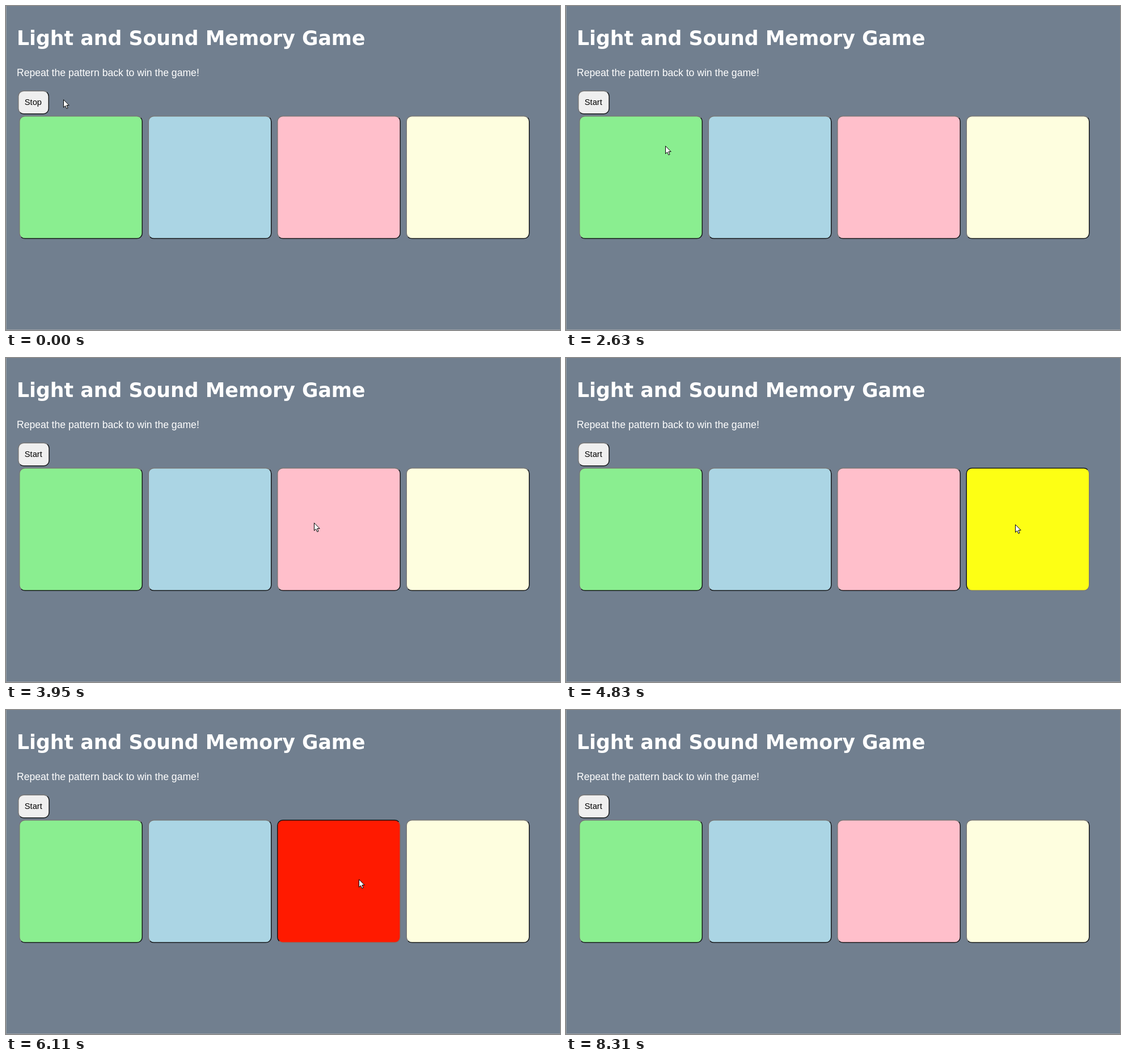
Write an HTML page that moves like this. It is 977 px wide and 573 px high and loops after 9.06 s.

```html
<!DOCTYPE html>
<html lang="en">
<head>
<meta charset="utf-8">
<title>Light and Sound Memory Game</title>
<style>
  html, body { margin: 0; width: 100%; height: 100%; overflow: hidden; background: #717f8f; }
  svg { display: block; width: 977px; height: 573px; }
  text { font-family: "Liberation Sans", Arial, sans-serif; fill: #fff; }
  .title { font: bold 34.75px "DejaVu Sans", Verdana, sans-serif; }
  .intro { font-size: 17.6px; }
  .label { font-size: 14.67px; fill: #000; }
</style>
</head>
<body>
<svg viewBox="0 0 977 573">
  <defs>
    <linearGradient id="raised" x2="1" y2="1">
      <stop offset=".5" stop-color="#767676"/><stop offset=".5" stop-color="#151719"/>
    </linearGradient>
    <linearGradient id="sunken" x2="1" y2="1">
      <stop offset=".5" stop-color="#151719"/><stop offset=".5" stop-color="#767676"/>
    </linearGradient>
  </defs>
  <rect width="977" height="573" fill="#717f8f"/>
  <path d="M.5 0V572.5H977" fill="none" stroke="#9a9fa5"/>
  <text class="title" x="18.9" y="69">Light and Sound Memory Game</text>
  <text class="intro" x="19" y="124">Repeat the pattern back to win the game!</text>
  <rect id="button" x="21.75" y="150.25" height="40.5" rx="9.5" fill="#efefef" stroke="url(#raised)" stroke-width="1.5"/>
  <text id="label" class="label" x="32.8" y="175"></text>
  <g id="tiles"></g>
  <path id="cursor" d="M.5 .7V14.3L3.6 11.4 5.8 16.4 8 15.5 5.9 10.6H10.2Z" fill="#fff" stroke="#000"/>
</svg>
<script>
const LOOP = 9060;
const CAPTURE_STEP = 140;
const STOPPED_AT = 1350;
const TILE = { x: 23, y: 194, pitch: 227.5, size: 218, border: 1.5 };
const COLORS = [
  ['#8aee90', '#008000'],
  ['#abd5e4', '#0000ff'],
  ['#ffbfcb', '#ff1a00'],
  ['#fefedf', '#fdff14'],
];
// The playback of the pattern lights a tile without pressing it.
const CLUE = { tile: 1, from: 120, to: 1070 };

// Pointer moves: from, to, x, y and, for a click, the time of the press.
// A press lasts until the next move begins.
const START = { x: 101, y: 165 };
const MOVES = [
  [0, 510, 54, 161],
  [STOPPED_AT, 1920, 115, 172],
  [2490, 2630, 175, 247],
  [2630, 2920, 176, 288, 2920],
  [3200, 3460, 318, 291, 3590],
  [3710, 3950, 543, 291, 4100],
  [4410, 4830, 792, 294, 4830],
  [4980, 5410, 792, 294, 5410],
  [5560, 6110, 622, 299, 6110],
  [6240, 6360, 348, 296, 6510],
  [6650, 7050, 160, 290, 7050],
  [7190, 7440, 676, 404],
  [7450, 7590, 990, 590],
  [7730, 7870, 970, 543],
  [7870, 8310, 978, 575],
].map(([from, to, x, y, press = Infinity]) => ({ from, to, x, y, press }));

const byId = id => document.getElementById(id);
const button = byId('button'), label = byId('label'), cursor = byId('cursor');
const ease = p => p * p * (3 - 2 * p);
const mix = (a, b, p) => a + (b - a) * p;

function setAttributes(node, attributes) {
  for (const [name, value] of Object.entries(attributes)) node.setAttribute(name, value);
}

const tiles = COLORS.map((_, i) => {
  const rect = document.createElementNS('http://www.w3.org/2000/svg', 'rect');
  const inset = TILE.border / 2, side = TILE.size - TILE.border;
  setAttributes(rect, {
    x: TILE.x + i * TILE.pitch + inset, y: TILE.y + inset,
    width: side, height: side, rx: 9.5, 'stroke-width': TILE.border,
  });
  return byId('tiles').appendChild(rect);
});

function pointerAt(t, move, previous) {
  const duration = move.to - move.from;
  const steps = Math.round(duration / CAPTURE_STEP);
  const progress = Math.min(1, (t - move.from) / duration);
  const p = ease(Math.floor(progress * steps) / steps);
  return [mix(previous.x, move.x, p), mix(previous.y, move.y, p)];
}

function render(t) {
  const running = t < STOPPED_AT;
  label.textContent = running ? 'Stop' : 'Start';
  button.setAttribute('width', running ? 53.5 : 54.3);

  const current = MOVES.findLastIndex(move => move.from <= t);
  const move = MOVES[current];
  const pointedTile = Math.floor((move.x - TILE.x) / TILE.pitch);

  tiles.forEach((rect, i) => {
    const pressed = t >= move.press && i === pointedTile;
    const clued = i === CLUE.tile && t >= CLUE.from && t < CLUE.to;
    setAttributes(rect, {
      fill: COLORS[i][+(pressed || clued)],
      stroke: `url(#${pressed ? 'sunken' : 'raised'})`,
    });
  });

  const [x, y] = pointerAt(t, move, MOVES[current - 1] || START);
  cursor.setAttribute('transform', `translate(${Math.round(x)} ${Math.round(y)})`);
}

const startTime = performance.now();
function tick() {
  render((performance.now() - startTime) % LOOP);
  requestAnimationFrame(tick);
}
tick();
</script>
</body>
</html>
```
